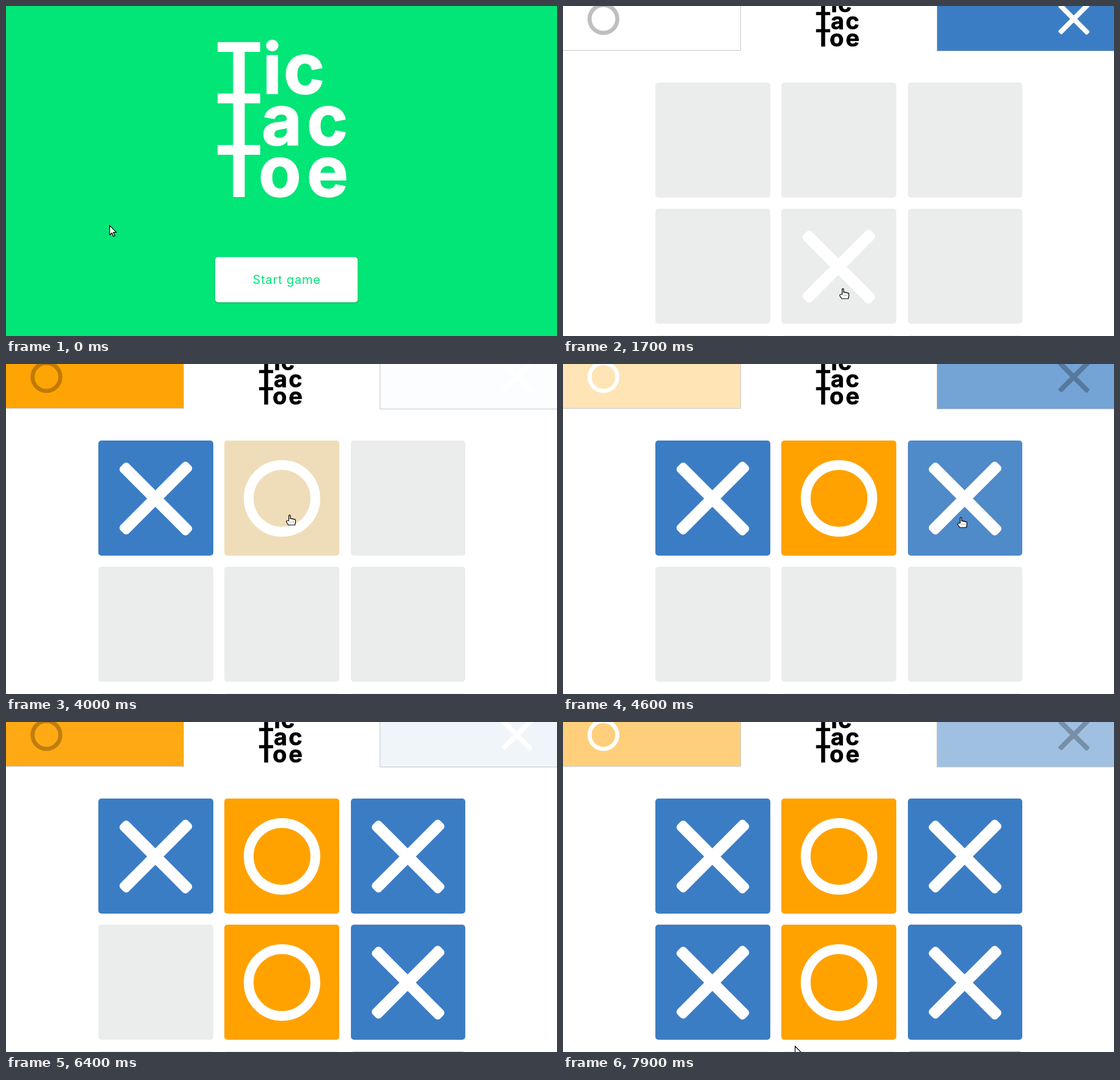
An HTML page that plays this animation: 901x539 px, repeating every 8 s.

```html
<!DOCTYPE html>
<html lang="en">
<head>
<meta charset="utf-8">
<title>Tic Tac Toe</title>
<style>
  html, body { margin: 0; width: 100%; height: 100%; overflow: hidden; background: #fff; }
  svg { display: block; width: 100vw; height: 100vh; }
  .logo { font: 700 113.5px Inter, sans-serif; font-optical-sizing: none; fill: currentColor; stroke: currentColor; stroke-width: 2; }
  .button { fill: #fff; filter: drop-shadow(0 1px 1px rgba(0, 0, 0, .25)); }
  .label { font: 400 20px Inter, sans-serif; letter-spacing: .8px; fill: #02e577; text-anchor: middle; }
  .ring { fill: none; stroke: currentColor; stroke-width: 16; }
  .cross { fill: currentColor; }
  .edge { fill: none; stroke: #c8c8c8; }
  .cursor path { fill: #fff; stroke: #000; stroke-width: 1.2; stroke-linejoin: round; }
  .cursor .ticks { fill: none; stroke-width: .8; }
</style>
</head>
<body>
<svg id="stage" viewBox="0 0 901 539">
  <defs>
    <g id="logo" class="logo">
      <text x="343 420 454" y="142.5">Tic</text>
      <text x="343 418 492" y="226.5">Tac</text>
      <text x="343 413 492" y="310.5">Toe</text>
    </g>
    <circle id="O" class="ring" cx=".3" cy=".5" r="54.5"/>
    <g id="X" class="cross">
      <rect x="-78" y="-9.5" width="156" height="19" rx="6" transform="translate(0 1.5) rotate(45)"/>
      <rect x="-78" y="-9.5" width="156" height="19" rx="6" transform="rotate(-45)"/>
    </g>
  </defs>

  <g id="start">
    <rect width="901" height="539" fill="#02e577"/>
    <use href="#logo" color="#fff"/>
    <rect class="button" x="342" y="410" width="233" height="74" rx="5"/>
    <text class="label" x="459" y="454">Start game</text>
  </g>

  <g id="game">
    <rect width="901" height="539" fill="#fff"/>
    <g id="playerO">
      <rect class="panel" width="291" height="73"/>
      <path class="edge" d="M0 72.5H290.5V0"/>
      <use class="icon" href="#O" transform="translate(66 21) scale(.417)"/>
    </g>
    <g id="playerX">
      <rect class="panel" x="611" width="290" height="74"/>
      <path class="edge" d="M611.5 0V73.5H901"/>
      <use class="icon" href="#X" transform="translate(835.5 20.8) scale(.425)"/>
    </g>
    <use href="#logo" color="#000" transform="translate(298.3 -37.5) scale(.33333)"/>
    <g id="board" color="#fff"></g>
  </g>

  <g id="arrow" class="cursor">
    <path d="M.5.5V16l3.6-3.4 2.5 5.9 2.4-1-2.5-5.8h5z"/>
  </g>
  <g id="hand" class="cursor">
    <path d="M4.5 10V1.8a1.2 1.2 0 0 1 2.4 0V6.5q2-.8 2.8.6 2-.6 2.7.6 2.9-.4 3 1.6V13l-1 4H3.8L.7 12.5q-.6-1.8 1-2.5z"/>
    <path class="ticks" d="M6.5 12h1M9 12h1M11.5 12h1"/>
  </g>
</svg>

<script>
  const LOOP = 8000, STEP = 100, GAME_START = 1700;
  const PANEL_FADE = 1000, CELL_FADE = 200;
  const WHITE = [255, 255, 255], EMPTY = [235, 237, 236];
  const COLORS = { X: [59, 125, 196], O: [255, 162, 0] };
  const COLS = [151, 357, 564], ROWS = [125, 331, 538], SIZE = 188;

  // [time, cell]; X plays first and the players alternate
  const MOVES = [[2845, 0], [3967, 1], [4480, 2], [5125, 4], [5590, 5], [6335, 8], [7600, 3]]
    .map(([time, cell], i) => ({ time, cell, mark: "XO"[i % 2] }));

  // Pointer legs: [start, end, x, y]
  const LEGS = [
    [540, 1310, 457, 461], [2140, 2710, 288, 240], [3250, 3900, 463, 246],
    [4040, 4450, 650, 250], [4640, 5060, 474, 394], [5310, 5500, 590, 500],
    [5500, 5600, 625, 455], [5800, 6100, 650, 490], [6100, 6200, 650, 585],
    [6500, 7200, 240, 430], [7420, 7500, 243, 432], [7620, 7900, 379, 529]
  ];
  const POINTER_HOME = [169, 358];

  const $ = id => document.getElementById(id);
  const clamp = v => Math.min(1, Math.max(0, v));
  const lerp = (a, b, k) => a + (b - a) * k;
  const mix = (a, b, k) => `rgb(${a.map((v, i) => Math.round(lerp(v, b[i], k)))})`;
  const show = (node, on) => node.style.display = on ? "" : "none";
  const swing = k => (1 - Math.cos(Math.PI * k)) / 2;

  // CSS "ease": cubic-bezier(.25, .1, .25, 1)
  function ease(k) {
    k = clamp(k);
    const curve = (a, b, s) => 3 * a * s * (1 - s) ** 2 + 3 * b * s * s * (1 - s) + s ** 3;
    let low = 0, high = 1;
    for (let i = 0; i < 20; i++) {
      const mid = (low + high) / 2;
      if (curve(.25, .25, mid) < k) low = mid; else high = mid;
    }
    return curve(.1, 1, low);
  }

  function make(parent, tag, attrs) {
    const node = document.createElementNS("http://www.w3.org/2000/svg", tag);
    for (const name in attrs) node.setAttribute(name, attrs[name]);
    return parent.appendChild(node);
  }

  const cells = Array.from({ length: 9 }, (_, i) => {
    const x = COLS[i % 3], y = ROWS[Math.floor(i / 3)], width = i % 3 === 2 ? SIZE - 1 : SIZE;
    const box = make($("board"), "rect", { x, y, width, height: SIZE, rx: 5 });
    const icon = make($("board"), "use", { transform: `translate(${x + width / 2} ${y + SIZE / 2})` });
    return { x, y, box, icon, move: MOVES.find(m => m.cell === i) };
  });

  function pointerAt(t) {
    let [x, y] = POINTER_HOME;
    for (const [from, to, tx, ty] of LEGS) {
      const k = swing(clamp((t - from) / (to - from)));
      x = lerp(x, tx, k);
      y = lerp(y, ty, k);
    }
    return { x, y };
  }

  const inside = (p, x, y, w, h) => p.x >= x && p.x < x + w && p.y >= y && p.y < y + h;

  // How far a player's panel is lit; each move starts a new fade from the current level
  function panelLevel(mark, t) {
    const levelAfter = (level, move, until) =>
      lerp(level, move.mark === mark ? 0 : 1, ease((until - move.time) / PANEL_FADE));
    const played = MOVES.filter(m => m.time <= t);
    return played.reduce((level, move, i) =>
      levelAfter(level, move, i + 1 < played.length ? played[i + 1].time : t), mark === "X" ? 1 : 0);
  }

  function drawPanel(mark, turn, t) {
    const active = mark === turn;
    const panel = $("player" + mark), icon = panel.querySelector(".icon");
    panel.querySelector(".panel").setAttribute("fill", mix(WHITE, COLORS[mark], panelLevel(mark, t)));
    icon.setAttribute("color", active ? "#fff" : "#000");
    icon.setAttribute("opacity", active ? 1 : .25);
  }

  function drawCell(cell, pointer, turn, t) {
    const { move } = cell;
    const taken = move && move.time <= t;
    const hovered = inside(pointer, cell.x, cell.y, SIZE, SIZE);
    const fill = taken ? mix(EMPTY, COLORS[move.mark], ease((t - move.time) / CELL_FADE)) : mix(EMPTY, EMPTY, 0);
    cell.box.setAttribute("fill", fill);
    cell.icon.setAttribute("href", "#" + (taken ? move.mark : turn));
    show(cell.icon, taken || hovered);
    return hovered;
  }

  function draw(t) {
    const playing = t >= GAME_START;
    const pointer = pointerAt(t);
    const turn = "XO"[MOVES.filter(m => m.time <= t).length % 2];
    show($("start"), !playing);
    show($("game"), playing);
    drawPanel("O", turn, t);
    drawPanel("X", turn, t);
    const overCell = cells.map(c => drawCell(c, pointer, turn, t)).some(Boolean);
    const overLink = playing ? overCell : inside(pointer, 342, 410, 233, 74);
    const x = Math.round(pointer.x), y = Math.round(pointer.y);
    show($("hand"), overLink);
    show($("arrow"), !overLink);
    $("hand").setAttribute("transform", `translate(${x - 5} ${y})`);
    $("arrow").setAttribute("transform", `translate(${x} ${y})`);
  }

  const begin = performance.now();
  function tick() {
    const t = (performance.now() - begin) % LOOP;
    draw(Math.floor(t / STEP) * STEP);
    requestAnimationFrame(tick);
  }
  tick();
</script>
</body>
</html>
```
